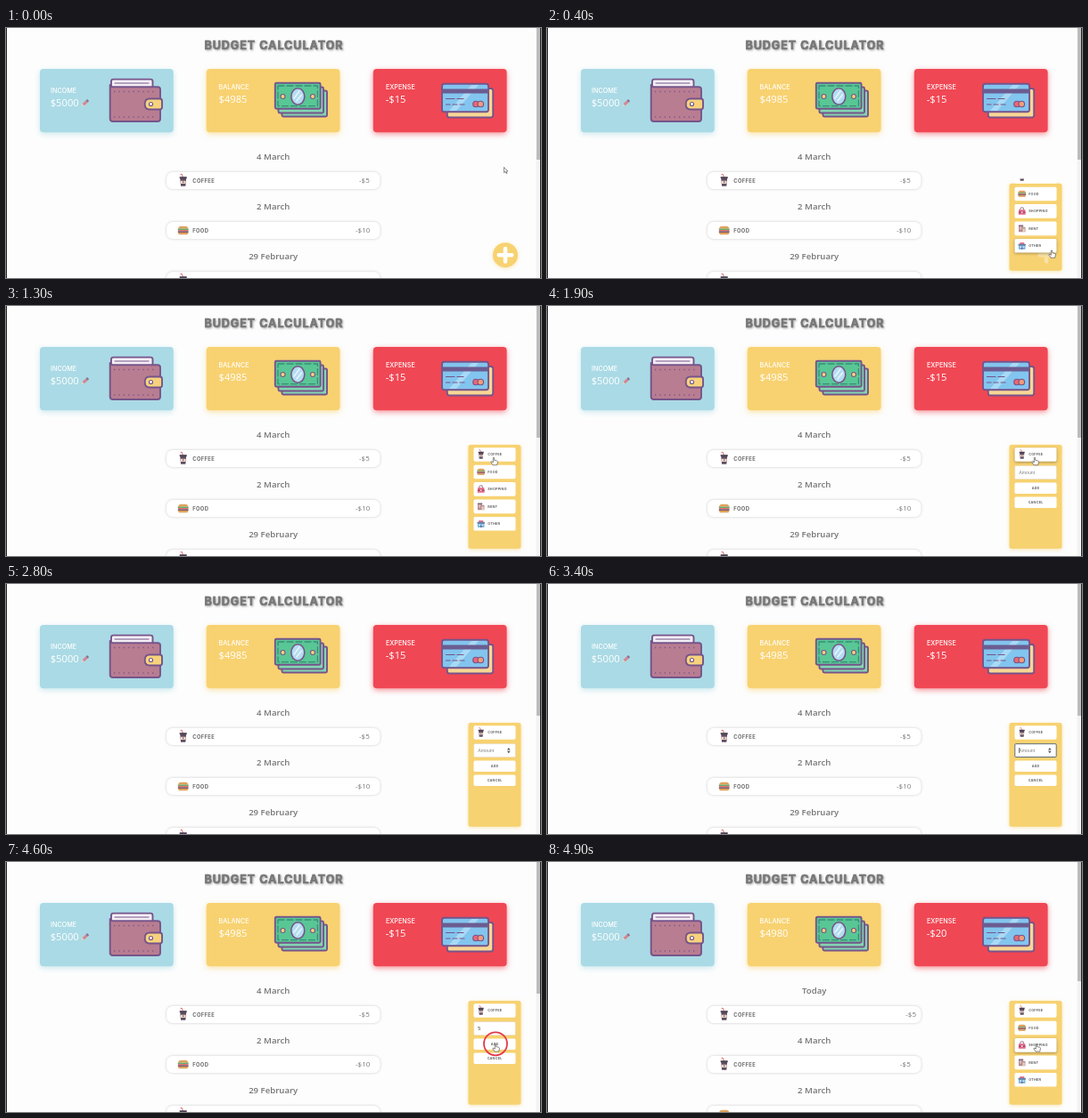
These frames come from a looping animation (600x281 px, 5.4 s). An HTML page:

```html
<!DOCTYPE html>
<html lang="en">
<head>
<meta charset="utf-8">
<title>Budget calculator</title>
<style>
html, body { margin: 0; width: 100%; height: 100%; overflow: hidden; background: #fdfdfd; }
svg { display: block; width: 100vw; height: 100vh; }
text { font-family: "Open Sans", "Noto Sans", sans-serif; }
.caps { font-family: Inter, Roboto, sans-serif; }
.title { font-size: 12.5px; font-weight: 700; letter-spacing: 1px; fill: #777; stroke: #777; stroke-width: .7;
  stroke-linejoin: round; filter: drop-shadow(1px 1.5px 1px #0005); }
.label { font-size: 7.2px; font-weight: 500; fill: #fff; }
.value { font-size: 11.2px; fill: #fff; }
.date { font-size: 9.6px; font-weight: 600; fill: #757575; text-anchor: middle; }
.name { font-size: 5.8px; font-weight: 700; letter-spacing: .35px; fill: #6c6c6c; }
.sum { font-size: 8px; fill: #777; }
.small { font-size: 3.8px; font-weight: 700; letter-spacing: .2px; fill: #666; }
.mid { text-anchor: middle; }
.field { font: 5.2px "Liberation Sans", Arial, sans-serif; }
.row { fill: #fff; filter: drop-shadow(0 .5px 1.5px #0003); }
.ink { stroke: #76548a; stroke-width: 1.9; stroke-linejoin: round; stroke-linecap: round; }
</style>
</head>
<body>
<svg viewBox="0 0 600 281" preserveAspectRatio="none">
  <defs>
    <g id="coffee">
      <path d="M-.3-4 L-1.3-7 L-3-7.2" fill="none" stroke="#e2605f" stroke-width="1"/>
      <path d="M-3.5-2.7 H3.5 L2.6 6.3 H-2.6 Z" fill="#5d4d5e"/>
      <path d="M-4-4.3 H4 V-2.4 H-4 Z" fill="#4b4152"/>
      <path d="M-3 .2 H3 L2.7 3.4 H-2.7 Z" fill="#e8dcd5"/>
      <circle cy="1.8" r="1" fill="#b5645a"/>
    </g>
    <g id="food">
      <path d="M-5.7-1.8 Q-5.2-4.8-2.5-4.8 H2.5 Q5.2-4.8 5.7-1.8 Z" fill="#dfa35c"/>
      <path d="M-6-1.9 H6 V-.4 H-6 Z" fill="#64ad72"/>
      <path d="M-5.8-.4 H5.8 V.8 H-5.8 Z" fill="#e4605a"/>
      <path d="M-5.9 .8 H5.9 V2.5 H-5.9 Z" fill="#80586a"/>
      <path d="M-5.7 2.5 H5.7 Q5.5 4.7 4 4.7 H-4 Q-5.5 4.7-5.7 2.5 Z" fill="#dfa35c"/>
    </g>
    <g id="shopping">
      <path d="M-2.5-1.5 V-3.5 Q-2.5-5.5 0-5.5 T2.5-3.5 V-1.5" fill="none" stroke="#876178" stroke-width="1.2"/>
      <path d="M-4.8-2.2 H4.8 L5.3 5 H-5.3 Z" fill="#e56686"/>
      <path d="M-5 .5 H5 V2.8 H-5 Z" fill="#a84d70"/>
      <circle cy="1.6" r="1.3" fill="#fbe0dc"/>
    </g>
    <g id="rent">
      <path d="M-5-4.5 H1.5 V-2 H5 V5.2 H-5 Z" fill="#b48a92"/>
      <path d="M-5-5 H2 V-3.4 H-5 Z" fill="#795d76"/>
      <path d="M-3.6-1.7 H-.6 M-3.6 .7 H-.6" stroke="#f1dfd0" stroke-width="1.2"/>
      <path d="M1-.3 H4 V5 H1 Z" fill="#ecd2b8"/>
    </g>
    <g id="other">
      <path d="M-5-1.5 H5 V5.2 H-5 Z" fill="#6dafd8"/>
      <path d="M-3.4-5 H3.4 V-2 H-3.4 Z" fill="#df7790"/>
      <path d="M-5.6-2.7 H5.6 V-.4 H-5.6 Z" fill="#66799f"/>
      <path d="M-3.5 1.8 H-1 M1 1.8 H3.5" stroke="#edf6fb" stroke-width="1.5"/>
      <path d="M-1 2.7 H1 V5.2 H-1 Z" fill="#795d85"/>
    </g>
    <clipPath id="clip"><rect id="clipBox" x="510" width="80"/></clipPath>
  </defs>

  <rect width="600" height="281" fill="#fdfdfd"/>
  <text class="caps title mid" x="300.5" y="23.6">BUDGET CALCULATOR</text>
  <g id="cards"></g>
  <g class="caps label">
    <text class="caps" x="50" y="72.6">INCOME</text>
    <text class="caps" x="238.5" y="68.7">BALANCE</text>
    <text class="caps" x="426" y="68.7">EXPENSE</text>
  </g>
  <text class="value" x="49.7" y="88">$5000</text>
  <text class="value" x="238.5" y="84" id="balance"></text>
  <text class="value" x="425.7" y="84" id="expense"></text>

  <g transform="translate(88.7 84.3) rotate(-42)">
    <path d="M-5 0 L-2.6-1.5 V1.5 Z" fill="#efd5b5"/>
    <path d="M-2.6-1.5 H2.5 V1.5 H-2.6 Z" fill="#d7858f"/>
    <path d="M2.5-1.5 H4.6 V1.5 H2.5 Z" fill="#8b6f91"/>
  </g>

  <g class="ink">
    <path d="M118 66 V60 Q118 57.6 120.5 57.6 H162 Q164.5 57.6 164.5 60 V66" fill="#f4eef5"/>
    <path d="M122 62 H160" stroke-width="1"/>
    <path d="M116.7 64 Q117 66.3 120 66.3 H170 Q173 66.3 173 69 V102 Q173 105 170 105 H120 Q116.7 105 116.7 102 Z" fill="#b97d91"/>
    <path d="M121 71.5 H168 M121 100 H168" stroke-width="1.5" stroke-dasharray="1.2 4.2" stroke-linecap="butt"/>
    <path d="M161 79.5 H172.5 Q175 79.5 175 82 V89 Q175 91.5 172.5 91.5 H161 Q155.7 91.5 155.7 85.5 T161 79.5 Z" fill="#f6d27c"/>
    <circle cx="162.5" cy="85.5" r="2" fill="#fff" stroke-width="1.2"/>
  </g>

  <g class="ink">
    <g fill="#83d5b1">
      <rect x="309.5" y="70.5" width="50.5" height="29" rx="1.5"/>
      <rect x="305.5" y="66.5" width="50.5" height="29" rx="1.5"/>
    </g>
    <rect x="301.8" y="61.8" width="50.8" height="29" rx="1.5" fill="#59c795"/>
    <rect x="305" y="65" width="44.4" height="22.6" fill="none" stroke="#398d78" stroke-width="1.3" stroke-dasharray="7 3"/>
    <ellipse cx="327.3" cy="77" rx="7.5" ry="9.2" fill="#b4dcf0" stroke-width="1.6"/>
    <path d="M323 79 L329 71 M326 82 L331.5 75" stroke="#e7f5fb" stroke-width="1.5"/>
    <circle cx="310.5" cy="77" r="2.5" fill="#f6d27c" stroke-width="1.1"/>
    <circle cx="344" cy="77" r="2.5" fill="#f6d27c" stroke-width="1.1"/>
  </g>

  <g class="ink" stroke-width="1.6">
    <rect x="494.8" y="68" width="51.4" height="32.5" rx="2.5" fill="#f8d795"/>
    <rect x="489" y="62.8" width="52" height="31.5" rx="2.5" fill="#82c5ee"/>
    <path d="M497 93 L522 64 H530 L505 93 Z" fill="#a9d9f5" stroke="none"/>
    <path d="M489 68.4 H541 V73.4 H489 Z" fill="#6b5d91" stroke="none"/>
    <path d="M493.5 79.5 H503 M506 79.5 H513 M493.5 86 H498 M501 86 H506 M509 86 H514" stroke-width="1.2"/>
    <circle cx="527" cy="85.5" r="3.3" fill="#ed6673" stroke-width="1.1"/>
    <circle cx="532.3" cy="85.5" r="3.3" fill="#f29b78" stroke-width="1.1"/>
  </g>

  <g id="before"></g>
  <g id="after"></g>

  <rect x="594.5" width="4.5" height="281" fill="#f3f3f3"/>
  <rect id="thumb" x="595" width="4" fill="#bcbcbc"/>
  <path d="M.5 0 V281 M599.5 0 V281" stroke="#222"/>

  <rect id="panel" fill="#f7d271" style="filter:drop-shadow(0 1px 2px #f7d27188)"/>
  <path id="plus" d="M560 248 V262.4 M552.8 255.2 H567.2" stroke="#fff" stroke-width="4.6" stroke-linecap="round"/>
  <g id="menu" clip-path="url(#clip)"></g>
  <g id="form">
    <g id="picked"></g>
    <rect id="input" x="524.8" y="179.7" width="46.4" height="14.8" rx="1"/>
    <text id="entry" class="field" x="529.3" y="188.8"></text>
    <path id="caret" d="M529.6 184 V190" stroke="#333" stroke-width=".7"/>
    <path id="spinner" d="M562 186.4 L563.8 184 L565.6 186.4 Z M562 187.8 L563.8 190.2 L565.6 187.8 Z" fill="#555"/>
    <g id="buttons"></g>
  </g>
  <circle id="ring" fill="none" stroke="#e23b4c" stroke-width="1.8"/>
  <path id="arrow" d="M0 0 V6.2 L1.5 4.9 L2.5 7.1 L3.5 6.6 L2.5 4.5 H4.4 Z" fill="#fff" stroke="#444" stroke-width=".6"/>
  <path id="hand" d="M-.7 .6 Q0-.4 .7 .6 V3.3 L3.6 4 Q4.6 4.3 4.4 5.5 L3.7 8.8 H-.9 L-3.2 5.6 Q-3.2 4.5-2 4.9 L-.7 5.9 Z"
    fill="#fff" stroke="#555" stroke-width=".7" stroke-linejoin="round"/>
</svg>
<script>
const LOOP = 5400, STEP = 100;
const $ = id => document.getElementById(id);
const set = (id, attrs) => { for (const k in attrs) $(id).setAttribute(k, attrs[k]); };
const show = (id, on) => set(id, { opacity: +on });
const clamp = v => Math.max(0, Math.min(1, v));
const mix = (a, b, p) => a + (b - a) * p;

$('cards').innerHTML = [[38, '#aadae5'], [224.7, '#f8d271'], [411.8, '#f04754']].map(([x, c]) =>
  `<rect x="${x}" y="46" width="149.8" height="71.3" rx="4" fill="${c}" style="filter:drop-shadow(0 2px 3px ${c}99)"/>`).join('');

function entry([date, kind, sum, x], i) {
  const y = 171.5 + 56 * i;
  return `<g id="${date.replace(' ', '')}"><text class="date" x="299.7" y="${y - 24}">${date}</text>
    <rect class="row" x="180" y="${y - 9.5}" width="239.5" height="19" rx="7"/>
    <use href="#${kind}" x="198.7" y="${y}"/>
    <text class="caps name" x="209.3" y="${y + 2}">${kind.toUpperCase()}</text>
    <text class="sum" x="${x}" y="${y + 2.7}">${sum}</text></g>`;
}
const history = [['4 March', 'coffee', '-$5', 396], ['2 March', 'food', '-$10', 392], ['29 February', 'coffee', '-$5', 396]];
$('before').innerHTML = history.map(entry).join('');
$('after').innerHTML = [['Today', 'coffee', '-$5', 402.3], ...history.slice(0, 2)].map(entry).join('');

const kinds = ['coffee', 'food', 'shopping', 'rent', 'other'];
const itemY = i => 167 + 19.45 * i;
const item = (kind, y) => `<g><rect x="524.5" y="${y - 7.8}" width="47" height="15.6" rx="1.7" fill="#fff"/>
  <use href="#${kind}" transform="translate(532.7 ${y}) scale(.75)"/>
  <text class="caps small" x="540.2" y="${y + 1.4}">${kind.toUpperCase()}</text></g>`;
$('menu').innerHTML = kinds.map((k, i) => item(k, itemY(i))).join('');
$('picked').innerHTML = item('coffee', itemY(0));
$('buttons').innerHTML = [['ADD', 204.7], ['CANCEL', 220.7]].map(([s, y]) =>
  `<g><rect x="524.5" y="${y - 6.3}" width="47" height="12.6" rx="1.7" fill="#fff"/>
  <text class="caps small mid" x="548.1" y="${y + 1.4}">${s}</text></g>`).join('');

// Pointer stops: time, x, y
const path = [[0, 558.5, 156.5], [100, 559.5, 186], [200, 559.5, 186], [300, 566, 249.5], [800, 566, 249.5],
  [1300, 547, 170], [2500, 547, 170], [2900, 548, 186], [4300, 548, 186], [4500, 549, 204.3], [LOOP, 549, 204.3]];
function pointer(t) {
  const i = Math.max(1, path.findIndex(k => k[0] >= t));
  const [t0, x0, y0] = path[i - 1], [t1, x1, y1] = path[i];
  const p = clamp((t - t0) / (t1 - t0)), e = p * p * (3 - 2 * p);
  return [mix(x0, x1, e), mix(y0, y1, e)];
}
const clicks = [[300, 13], [1700, 13], [3200, 9], [3300, 13], [4500, 8], [4600, 13]];
const hovered = y => kinds.findIndex((k, i) => Math.abs(y - itemY(i)) < 7.8);
const glow = (el, on) => { el.style.filter = on ? 'drop-shadow(0 1.5px 1.5px #0005)' : 'none'; };

function render(ms) {
  const t = Math.floor(ms % LOOP / STEP) * STEP;
  const open = t < 400 ? 0 : t < 500 ? .78 : t < 600 ? .97 : 1;
  const wide = clamp(open * 1.3);
  const form = t >= 1800 && t < 4700, done = t >= 4700;

  const left = mix(546, 518.5, wide), right = mix(574, 577.5, wide);
  const top = mix(241.2, 156, open), bottom = mix(269.2, 272.7, wide);
  set('panel', { x: left, y: top, width: right - left, height: bottom - top, rx: mix(14, 2.5, wide) });
  set('plus', { opacity: open < 1 ? (1 - open) * (open ? 1.6 : 1) : 0 });
  set('clipBox', { y: top - 7 * open, height: bottom - top + 7 });
  set('menu', { opacity: form ? 0 : wide });
  set('form', { opacity: form ? (t < 1900 ? .6 : 1) : 0 });

  const [x, y] = pointer(t), lastY = pointer(Math.max(0, t - STEP))[1];
  const over = hovered(lastY);
  [...$('menu').children].forEach((el, i) => glow(el, t >= 400 && i === over));
  glow($('picked').firstChild, over === 0);

  const focus = t >= 3300 && t < 4500, typed = t >= 4000;
  set('input', { fill: '#fff', stroke: focus ? '#4d6075' : '#ddd', 'stroke-width': focus ? .9 : .5 });
  $('entry').textContent = typed ? '5' : 'Amount';
  set('entry', { fill: typed ? '#333' : '#808080' });
  show('caret', t >= 3300 && t < 3800);
  show('spinner', t >= 2800 && t < 4500);

  $('balance').textContent = done ? '$4980' : '$4985';
  $('expense').textContent = done ? '-$20' : '-$15';
  show('before', !done);
  show('after', done);
  set('Today', { opacity: clamp((t - 4600) / 250) });
  set('thumb', { height: done ? 134 : 148 });

  const click = clicks.find(c => c[0] === t);
  show('ring', click);
  $('ring').style.display = click ? '' : 'none';
  if (click) set('ring', { cx: x, cy: y, r: click[1] });

  const inField = form && y > 179.5 && y < 195;
  const onButton = form ? hovered(y) === 0 || y > 198 : t >= 400 ? hovered(y) >= 0 : y > 241;
  for (const id of ['arrow', 'hand']) {
    set(id, { transform: `translate(${x} ${y})` });
    show(id, !inField && (id === 'hand') === onButton);
  }
}

const start = performance.now();
function tick() {
  render(performance.now() - start);
  requestAnimationFrame(tick);
}
tick();
</script>
</body>
</html>
```
